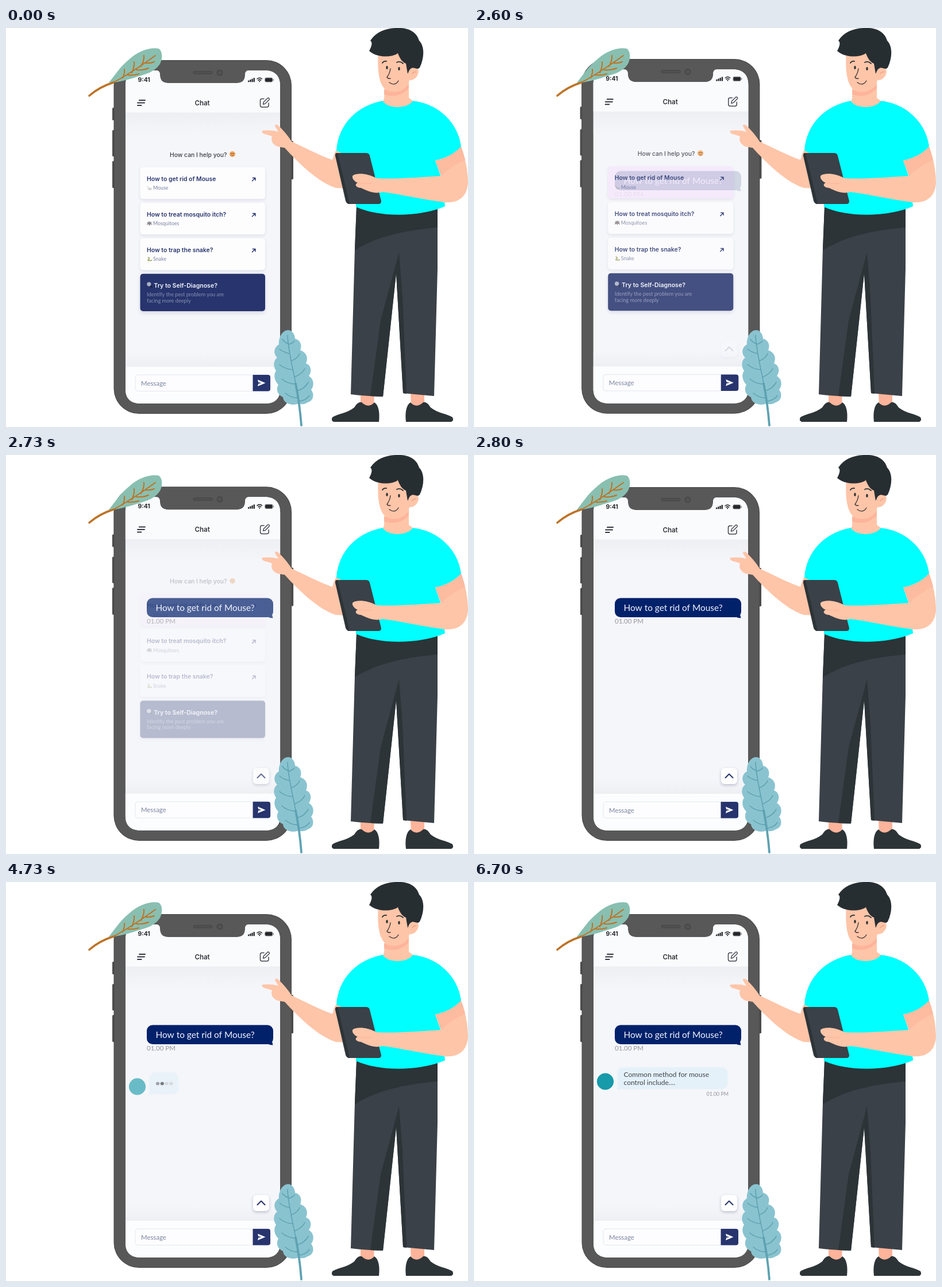
An HTML page with a canvas that plays this animation: 804 px wide and 696 px high, repeating every 8000 ms.

```html
<!DOCTYPE html>
<html lang="en">
<head>
<meta charset="utf-8">
<title>Chat help</title>
<style>
html, body { margin: 0; width: 100%; height: 100%; overflow: hidden; background: #fff; }
canvas { display: block; width: 804px; height: 696px; }
</style>
</head>
<body>
<canvas id="stage" width="804" height="696"></canvas>
<script>
const stage = document.getElementById('stage').getContext('2d');
const buffer = Object.assign(document.createElement('canvas'), { width: 804, height: 696 }).getContext('2d');
let ctx = stage;

const LOOP = 8000;
const HEAD = 'Inter, "Open Sans", sans-serif';
const BODY = 'Lato, "Open Sans", sans-serif';
const NAVY = '#27346d', SKIN = '#fec5a8', BLUSH = '#fdb49a';
const TROUSERS = '#3b4148', DARK = '#2c3437', HAIR = '#272e32';

const clamp = v => Math.min(1, Math.max(0, v));
// Fades advance in about 33 ms steps; the first step is already visible at its start.
const ramp = (t, from, to) => t < from ? 0 : clamp((t - from + 33) / (to - from + 33));

function shape(d, fill) {
  ctx.fillStyle = fill;
  ctx.fill(new Path2D(d));
}

function line(d, color, width) {
  ctx.strokeStyle = color;
  ctx.lineWidth = width;
  ctx.lineCap = ctx.lineJoin = 'round';
  ctx.stroke(new Path2D(d));
}

function box(x, y, w, h, r, fill, stroke) {
  ctx.beginPath();
  ctx.roundRect(x, y, w, h, r);
  ctx.fillStyle = fill;
  ctx.fill();
  if (stroke) {
    ctx.strokeStyle = stroke;
    ctx.lineWidth = 1;
    ctx.stroke();
  }
}

function dot(x, y, rx, fill, ry = rx) {
  ctx.beginPath();
  ctx.ellipse(x, y, rx, ry, 0, 0, 7);
  ctx.fillStyle = fill;
  ctx.fill();
}

function text(str, x, y, size, color, family = BODY, weight = 400) {
  ctx.font = `${weight} ${size}px ${family}`;
  ctx.fillStyle = color;
  ctx.fillText(str, x, y);
}

function shaded(color, blur, dy, draw) {
  ctx.save();
  ctx.shadowColor = color;
  ctx.shadowBlur = blur;
  ctx.shadowOffsetY = dy;
  draw();
  ctx.restore();
}

// Draws a group as one picture, so that its overlapping parts fade together.
function layer(alpha, draw, dy = 0) {
  if (alpha <= 0) return;
  if (alpha >= 1) return draw();
  buffer.resetTransform();
  buffer.clearRect(0, 0, 804, 696);
  buffer.setTransform(stage.getTransform());
  buffer.translate(0, dy);
  ctx = buffer;
  draw();
  ctx = stage;
  ctx.save();
  ctx.resetTransform();
  ctx.globalAlpha = alpha;
  ctx.drawImage(buffer.canvas, 0, 0);
  ctx.restore();
}

function fadeBand(y, h, from, to) {
  const g = ctx.createLinearGradient(0, y, 0, y + h);
  g.addColorStop(0, from);
  g.addColorStop(1, to);
  ctx.fillStyle = g;
  ctx.fillRect(208, y, 270, h);
}

const SCREEN = 'M208 100C208 84 217 74 234 74L261 74C266 74 268 77 268 82C268 91 273 96 282 96' +
  'L402 96C411 96 416 91 416 82C416 77 418 74 423 74L450 74C468 74 477 84 477 100' +
  'L477 630C477 646 468 655 452 655L234 655C217 655 208 646 208 630Z';

function phone() {
  for (const [x, y, h] of [[185, 139, 22], [185, 178, 46], [185, 232, 47], [495, 197, 67]])
    box(x, y, 5, h, 1.5, '#4b4b4b');
  box(187.5, 56, 309.5, 617, 44, '#4d4d4d');
  box(188.7, 57.2, 307, 614.6, 43, '#585858');
  box(326, 75.5, 33, 4.5, 2.2, '#505050', '#454545');
  dot(372, 78, 5.5, '#484848');
  dot(372, 78, 3.3, '#535353');

  ctx.save();
  ctx.clip(new Path2D(SCREEN));
  ctx.fillStyle = '#f5f6fa';
  ctx.fillRect(200, 60, 290, 610);
  ctx.fillStyle = '#fafbfd';
  ctx.fillRect(200, 60, 290, 87.5);
  fadeBand(147.5, 38, '#eeeff3', '#f5f6fa');
  fadeBand(565, 26, '#f5f6fa', '#eeeff3');
  ctx.fillStyle = '#fcfdfe';
  ctx.fillRect(200, 591, 290, 70);
  ctx.restore();

  statusBar();
  line('M232 126H242M229 130.5H241M229 135H235.5', '#333740', 2);
  text('Chat', 328.5, 134.5, 11.5, '#303238', HEAD, 600);
  line('M449 123.5H445.5Q442.5 123.5 442.5 126.5V135Q442.5 138 445.5 138H454Q457 138 457 135V131',
    '#42464f', 1.5);
  line('M447.5 133L448.3 129.3L455.2 122.4Q456.5 121.4 457.8 122.7Q459 124 457.9 125.2L451 132.1Z',
    '#42464f', 1.4);

  box(225, 605, 234, 28.5, 5, '#fdfdff', '#e4e7f0');
  text('Message', 235, 623.5, 11.4, '#7b849f');
  box(429.5, 605, 30.5, 28.5, [0, 4, 4, 0], NAVY);
  shape('M438 613.5L451.5 619.3L438 625L439.2 620.5L445 619.3L439.2 618Z', '#fff');
}

function statusBar() {
  text('9:41', 229.5, 94, 10.4, '#24272c', HEAD, 700);
  for (let i = 0; i < 4; i++) box(421 + i * 3.2, 91.5 - i * 1.5, 2.3, 2.8 + i * 1.5, .6, '#24272c');
  line('M437 88.8Q441.2 85.2 445.4 88.8M438.8 91.2Q441.2 89 443.6 91.2', '#24272c', 1.5);
  dot(441.2, 93.2, 1.1, '#24272c');
  box(450.8, 87, 13, 7, 2, '#24272c', '#777');
  box(464.8, 89, 1.2, 3, .5, '#777');
}

function mouse(x, y) {
  line(`M${x - 4} ${y - 3}Q${x - 1} ${y - 3} ${x - 2} ${y + 1}`, '#c9c2c5', 1);
  dot(x + 1, y + 1.5, 3.2, '#d7d4d8', 2.2);
}

function mosquito(x, y) {
  dot(x, y - 1, 4, '#a3a5ad', 2.8);
  line(`M${x - 4} ${y + 2}L${x} ${y - 2}L${x + 4} ${y + 2}M${x} ${y}V${y + 3}`, '#7a6666', 1);
}

function snake(x, y) {
  line(`M${x - 2} ${y - 3}Q${x + 2} ${y - 2} ${x - 2} ${y + 1}Q${x - 4} ${y + 3} ${x + 4} ${y + 2}`,
    '#a3a968', 1.8);
}

function card(y, title, label, icon, fill) {
  shaded('rgba(60,70,110,.13)', 5, 2, () => box(233.5, y, 217.5, 55.5, 5, fill));
  text(title, 245, y + 24, 10.45, NAVY, HEAD, 600);
  icon(249.5, y + 36.5);
  text(label, 256, y + 39.5, 8.8, '#79819f');
  line(`M428.5 ${y + 24}L433.5 ${y + 19}M429.3 ${y + 18.7}H433.8V${y + 23}`, NAVY, 1.5);
}

function menu(hover) {
  text('How can I help you?', 285, 224.5, 10.35, '#3b3e46', HEAD, 500);
  dot(394, 220, 5, '#f0a65c');
  line('M391 219H397', '#8a5335', 1.2);
  line('M392 222Q394 223.8 396 222', '#a85a32', 1);
  const mix = (a, b) => Math.round(a + (b - a) * hover);
  card(242.8, 'How to get rid of Mouse', 'Mouse', mouse,
    `rgb(${mix(253, 245)},${mix(253, 233)},${mix(254, 252)})`);
  card(304.8, 'How to treat mosquito itch?', 'Mosquitoes', mosquito, '#fdfdfe');
  card(366.8, 'How to trap the snake?', 'Snake', snake, '#fdfdfe');
  shaded('rgba(60,70,110,.16)', 6, 3, () => box(233.5, 428.8, 217.5, 65.2, 5, NAVY));
  line('M251 449L254 452', '#1a1d2c', 2);
  dot(248.8, 446.8, 3.6, '#a9b0c4');
  text('Try to Self-Diagnose?', 257.3, 453, 10.55, '#f3f5fb', HEAD, 600);
  text('Identify the pest problem you are', 245, 468.3, 9.2, '#8890b4');
  text('facing more deeply', 245, 478.6, 9.2, '#8890b4');
}

function question() {
  box(245, 249.5, 220, 33.5, 10, '#02216b');
  shape('M455 282L463 278L464.5 284.5Q459 284.5 455 282Z', '#02216b');
  text('How to get rid of Mouse?', 260.5, 272, 15.4, '#f2f5fc');
  text('01.00 PM', 245, 294, 11.5, '#96979e');
  shaded('rgba(60,70,110,.3)', 5, 2, () => box(430, 546, 28, 28, 6, '#fff'));
  line('M437.5 563L444 556.5L450.5 563', NAVY, 2.1);
}

function reply(t, swap) {
  const paper = '#e5f1f9';
  dot(228.5, 348, 14.6, '#179aa9');
  shape('M250 350L249 363Q255 362 260 360Z', paper);
  box(249.5, 323, 51, 38.5, 10, paper);
  layer(1 - swap, () => {
    const head = Math.floor((t - 5087) / 241.4) + 7;
    for (let i = 0; i < 4; i++) {
      const age = (head - i + 8) % 4;
      dot(264 + i * 7.8, 342.6, 3.2, ['#32363b', '#6d7278', '#c3cacf', '#c3cacf'][age], 2.9);
    }
  });
  layer(swap, () => {
    box(249.5, 323, 192, 38.5, 10, paper);
    text('Common method for mouse', 260.5, 339.5, 12.05, '#3e4248');
    text('control include....', 260.5, 353.5, 12.05, '#3e4248');
    text('01.00 PM', 404.5, 372.5, 8.9, '#929399');
  });
}

function leaves() {
  shape('M177 98C190 82 198 68 214 55C230 40 252 33 266 36C273 41 273 55 267 64C258 77 242 81 228 85C208 92 192 94 177 98Z',
    '#89bfb0');
  line('M145 118Q164 101 187 95Q217 79 260 48M203 87Q207 78 206 72M219 78Q224 67 223 59' +
    'M235 67Q241 56 240 48M212 82Q222 83 231 80M227 73Q239 74 248 70M243 61Q252 62 258 59',
    '#bd7326', 2);
  line('M145 118Q162 103 187 95', '#bd7326', 3.6);

  shape('M491 527C498 527 503 535 503 542C512 544 516 553 512 562C522 565 527 575 522 585' +
    'C531 588 533 599 527 607C536 612 537 624 531 631C538 640 534 651 525 653C519 657 514 657 510 655' +
    'C497 660 483 655 482 644C473 640 469 631 474 622C467 615 465 605 470 598' +
    'C464 589 466 579 472 575C464 567 467 556 475 552C474 540 481 527 491 527Z', '#8ac3d0');
  line('M490 536C491 575 510 625 514 693M494 568Q483 566 476 560M496 581Q508 576 511 568' +
    'M499 596Q485 595 476 587M502 609Q516 603 520 594M504 621Q490 621 480 612' +
    'M507 633Q520 629 526 618M509 645Q497 646 486 637M511 651Q523 649 528 641M492 552Q500 549 502 546' +
    'M492 551Q484 548 481 543', '#5ea2b2', 1.6);
  line('M504 620Q511 655 514 693', '#5ea2b2', 3.8);
}

function foot() {
  shape('M617 636H641L640 662H617Z', BLUSH);
  shape('M649 687H570Q565 684 568 679C577 673 594 672 606 662C611 654 615 652 619 653C627 661 635 660 641 653C648 657 651 670 649 687Z', DARK);
}

function legs() {
  foot();
  ctx.save();
  ctx.translate(1345, 0);
  ctx.scale(-1, 1);
  foot();
  ctx.restore();
  shape('M610 312H751V420L745 642L691 637L679 428L656 643Q625 642 600 639L607 385Z', TROUSERS);
  shape('M684 391L652 510L634 642L656 643L679 428L691 637L697 638L690 470Z', DARK);
  shape('M610 312H751V348C708 352 652 359 607 388Z', DARK);
}

function torso() {
  shape('M575 213C570 219 570 226 568 230C545 222 517 207 497 198C491 188 483 179 475 171C471 167 466 168 469 173L474 181' +
    'C465 178 454 178 446 179C444 182 448 185 454 186L463 189C460 197 465 204 473 207L485 209' +
    'C510 237 545 270 574 279L600 280L612 225Z', SKIN);
  shape('M656 127C610 135 578 169 575 214L590 221L610 240L609 312C650 331 720 330 764 311L757 260L747 231' +
    'C764 228 780 220 792 207C787 166 753 131 706 127Z', '#0ff');
  shape('M659 98L658 123L656 128C665 141 698 142 708 127L701 122V90Z', SKIN);
  shape('M658 107C672 115 691 111 701 98V105C689 119 672 121 658 116Z', BLUSH);
  shape('M577 218H626Q632 218 633 223L653 302Q653 307 648 307H598Q593 307 591 302L573 223Q572 218 577 218Z', TROUSERS);
  shape('M573 222L593 304Q594 307 598 307L577 218Q573 218 573 222Z', DARK);
  shape('M747 231C764 228 780 220 792 207C799 226 804 248 804 271C802 295 787 306 763 304' +
    'C725 299 687 290 655 286C642 290 631 285 618 279C607 278 607 272 612 270C604 267 601 259 604 257' +
    'C612 252 630 254 645 262C681 264 719 260 757 258Z', SKIN);
  shape('M747 231C764 228 780 220 792 207C795 215 797 222 799 230C784 236 768 247 757 258Z', '#fdbba0');
  line('M614 270Q626 272 636 271', BLUSH, 1.2);
}

function face() {
  shape('M648 40C646 66 648 86 653 97C658 109 668 113 681 111C693 109 700 101 702 91C709 92 717 86 718 76L708 36Z', SKIN);
  shape('M632 40C637 31 638 25 634 22C645 5 665 -1 687 0C706 1 716 11 719 22C729 32 728 52 720 69' +
    'C716 74 711 68 706 70C701 72 701 77 699 80L696 62C690 60 685 53 682 44C671 52 645 52 632 40Z', HAIR);
  dot(663, 69, 1.7, DARK, 3);
  dot(684, 71, 1.7, DARK, 3);
  line('M655 61Q657 57 662 58M680 60Q686 57 691 62', DARK, 1.8);
  line('M669 71Q668 79 663 86Q665 89 669 88M667 95Q677 102 683 92', '#42383a', 1.4);
  line('M707 80Q711 75 713 77', '#ee967d', 1.2);
}

function draw(now) {
  const t = now % LOOP;
  const hover = ramp(t, 500, 1000);
  const ask = ramp(t, 2600, 2800);
  const enter = ramp(t, 4430, 4930);
  const swap = ramp(t, 6500, 6700);
  const press = hover - ask;

  ctx.fillStyle = '#fff';
  ctx.fillRect(0, 0, 804, 696);

  ctx.save();
  ctx.translate(342, 364 - 1.3 * press);
  ctx.scale(1 + .003 * press, 1 + .003 * press);
  ctx.translate(-342, -364);
  phone();
  layer(1 - ask, () => menu(hover));
  ctx.restore();

  layer(ask, question);
  layer(enter, () => reply(t, swap), 24 * (1 - enter));
  leaves();
  legs();
  torso();
  face();
}

const start = performance.now();
function tick() {
  draw(performance.now() - start);
  requestAnimationFrame(tick);
}
tick();
</script>
</body>
</html>
```
